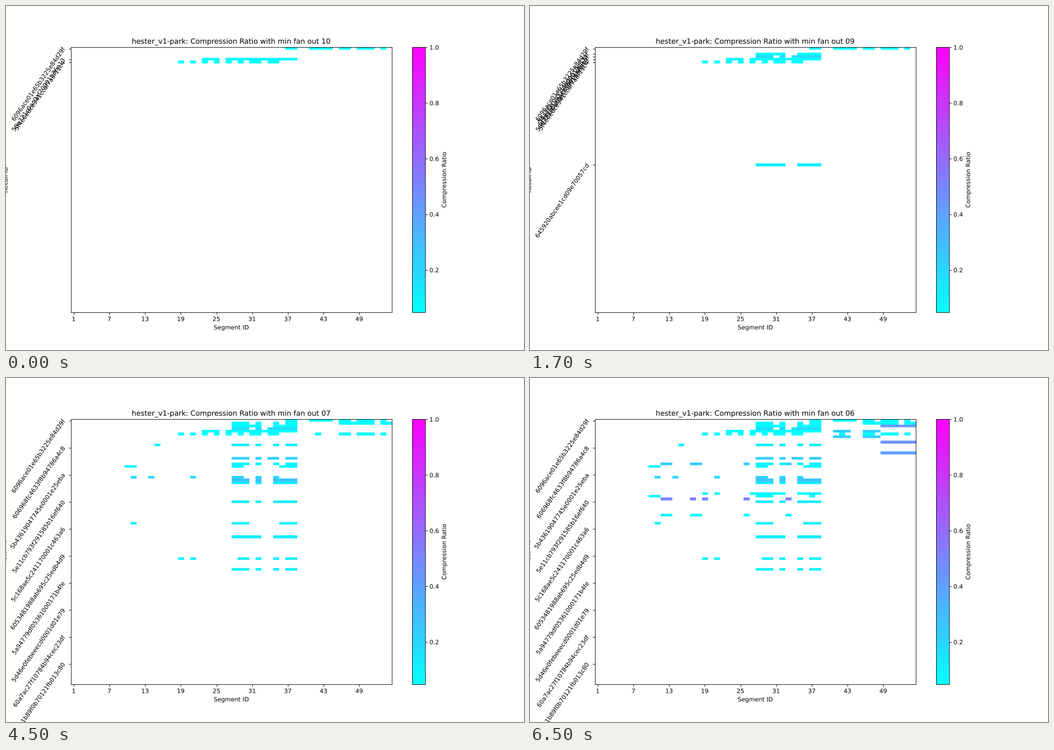
Write a matplotlib script that moves like this. It is 917 px wide and 611 px high and loops after 8 s.

```python
import numpy as np
import matplotlib.pyplot as plt
from matplotlib.animation import FuncAnimation
from matplotlib.cm import ScalarMappable
from matplotlib.colors import Normalize
from matplotlib.patheffects import Normal
from matplotlib.text import Text

WIDTH, HEIGHT, DPI = 917, 611, 76.375
ROWS, COLS = 98, 54
FINE_ROWS, FINE_COLS = 616, 744  # heatmap raster before smoothing
STEP_MS, STEPS = 500, 16
CHANGES = (1, 5, 9, 13)  # steps at which the fan-out limit drops by one

# fan out -> (row, compression ratio, segment ranges)
RUNS = {
    10: [
        (0, 0.05, "37-38 41-44 46-47 49-51 53"),
        (4, 0.05, "23-25 27-38"),
        (5, 0.05, "19 21 23 25 27 29 31-32 34-35"),
    ],
    9: [
        (2, 0.06, "28-32 35-38"),
        (3, 0.18, "28-30 32 34-38"),
        (43, 0.12, "28-32 35-38"),
    ],
    8: [
        (1, 0.06, "46-51 53-54"),
        (9, 0.10, "15 28-30 32 35 37-38"),
        (14, 0.23, "28-30 32 34-35 37-38"),
        (22, 0.28, "28-30 32 35-38"),
        (30, 0.12, "28-30 32 35-38"),
        (51, 0.10, "19 21 29-30 32 35 37-38"),
    ],
    7: [
        (1, 0.06, "28-30 32 35 37-38"),
        (5, 0.06, "42 46-47 49-51 53"),
        (16, 0.09, "28-30 32 35 37-38"),
        (17, 0.06, "10-11 28-29 36-38"),
        (21, 0.20, "11 14 21 28-29 32 35"),
        (23, 0.12, "28-30 32 35-38"),
        (38, 0.09, "11 28-30 36-38"),
        (55, 0.10, "28-30 32 35 37-38"),
    ],
    6: [
        (2, 0.44, "49-54"),
        (4, 0.22, "41-43 46-48"),
        (6, 0.22, "41-43 46-48"),
        (8, 0.46, "49-54"),
        (12, 0.40, "49-54"),
        (16, 0.23, "12-13 17-18 26 33"),
        (27, 0.07, "19 21 27-32 35-38"),
        (28, 0.06, "10-11 28-30 37"),
        (29, 0.50, "12-13 17 19 26 33"),
        (35, 0.07, "12-13 17-18 26 33"),
    ],
}

ROW_IDS = {
    0: "6096ace01e65b3225e84d29f",
    2: "56a7f3c0c12f4e00019c83af",
    3: "5f3c08f1a92ce70001c46e5f",
    4: "58e721c0ac0af70001b36a13",
    5: "5f4e0edce341ccaf7a8f11c4",
    10: "606968fc4633f8b94786a4c8",
    20: "5b43619047745e0001e25eba",
    30: "5e11cb793f291585b16ef640",
    40: "5c168ae5c241170001c463a6",
    43: "645920abcee1cd09e70057cd",
    50: "6053481988ab695c25edb4d9",
    60: "5a94779df05361000171b4fe",
    70: "5d46e0febeeecd0001d01e79",
    80: "60a7ac27f10784b94cec23df",
    90: "5ec01b89f0b70121fb013c80",
}


def ratio_grid(min_fan_out):
    grid = np.full((ROWS, COLS), np.nan)
    for fan_out, runs in RUNS.items():
        if fan_out < min_fan_out:
            continue
        for row, ratio, ranges in runs:
            for part in ranges.split():
                ends = part.split("-")
                grid[row, int(ends[0]) - 1:int(ends[-1])] = ratio
    return np.ma.masked_invalid(grid)


def tick_rows(grid):
    """Label every used row while there are few, else every tenth row."""
    used = [r for r in range(ROWS) if grid[r].count()]
    return used if len(used) <= 10 else list(range(0, ROWS, 10))


def cell_index(fine, cells):
    return ((np.arange(fine) + 0.5) * cells / fine).astype(int)


def heatmap(grid):
    """Colour the grid on a fine raster so that cell edges come out smooth."""
    rows, cols = cell_index(FINE_ROWS, ROWS), cell_index(FINE_COLS, COLS)
    return scale.to_rgba(grid)[np.ix_(rows, cols)]


plt.rcParams.update({"font.family": "DejaVu Sans", "text.hinting": "none"})
scale = ScalarMappable(
    Normalize(0.0483, 1.0), plt.get_cmap("cool").with_extremes(bad="white"))
fig, ax = plt.subplots(
    figsize=((WIDTH + 1e-6) / DPI, (HEIGHT + 1e-6) / DPI), dpi=DPI)
image = ax.imshow(heatmap(ratio_grid(10)), aspect="auto",
                  interpolation="hanning",
                  extent=(-0.5, COLS - 0.5, ROWS - 0.5, -0.5))
fig.colorbar(scale, ax=ax, label="Compression Ratio")
ax.set_xticks(range(0, 49, 6), range(1, 50, 6))
ax.set_xlabel("Segment ID")
ax.set_ylabel("Recall ID", labelpad=3)


def update(step):
    min_fan_out = 10 - sum(step >= change for change in CHANGES)
    grid = ratio_grid(min_fan_out)
    image.set_data(heatmap(grid))
    rows = tick_rows(grid)
    ax.set_yticks(rows, [ROW_IDS[r] for r in rows], rotation=55)
    ax.set_title("hester_v1-park: Compression Ratio "
                 f"with min fan out {min_fan_out:02d}")
    # Outline drawing keeps glyphs at sub-pixel positions.
    for text in fig.findobj(Text):
        text.set_path_effects([Normal()])
    return [image]


anim = FuncAnimation(fig, update, frames=STEPS, interval=STEP_MS,
                     repeat=True, repeat_delay=0, blit=False)
plt.show()
```
